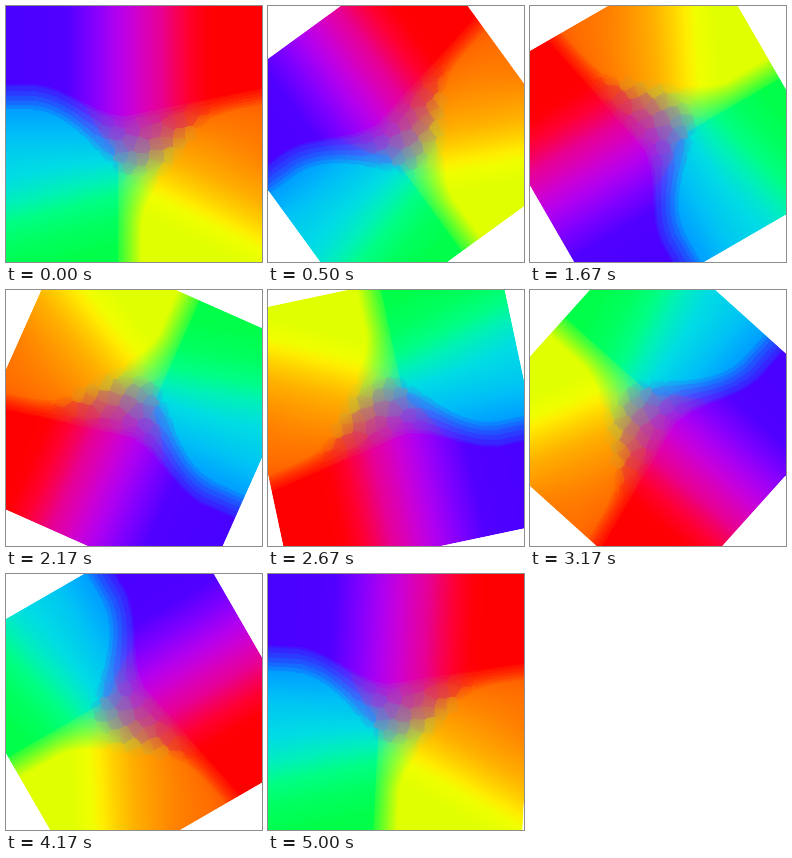
Write an HTML page with a canvas that moves like this. It is 256 by 256 pixels and loops after 5.08 s.

```html
<!DOCTYPE html>
<html lang="en">
<head>
<meta charset="utf-8">
<title>Rotating colour field</title>
<style>
  html, body { margin: 0; width: 100%; height: 100%; overflow: hidden; background: #fff; }
  main { position: relative; width: 100%; height: 100%; overflow: hidden; contain: strict; }
  canvas { position: absolute; left: -9px; top: -7px; width: 270px; height: 270px; }
</style>
</head>
<body>
<main><canvas id="field" width="270" height="270"></canvas></main>
<script>
const SIZE = 270, LEFT = -9, TOP = -7, CELL = 12, LOOP = 5080;
const canvas = document.getElementById('field');

const clamp = v => Math.min(1, Math.max(0, v));
const smooth = v => { v = clamp(v); return v * v * (3 - 2 * v); };
const lerp = (a, b, t) => a + (b - a) * t;
const mix = (a, b, t) => a.map((v, i) => lerp(v, b[i], t));

function ramp(text) {
  const stops = text.split(' ').map(s => {
    const [pos, hex] = s.split('#');
    const n = parseInt(hex, 16);
    return { pos: +pos, rgb: [n >> 16, n >> 8 & 255, n & 255] };
  });
  return v => {
    if (v <= stops[0].pos) return stops[0].rgb;
    for (let i = 1; i < stops.length; i++) {
      const a = stops[i - 1], b = stops[i];
      if (v < b.pos) return mix(a.rgb, b.rgb, (v - a.pos) / (b.pos - a.pos));
    }
    return stops[stops.length - 1].rgb;
  };
}

const violetToRed = ramp('0#4800ff 60#5000ff 85#7e00ff 110#b000f0 128#cc00d4 140#da00b6 155#e60094 168#f40060 182#ff0030 200#ff0008 215#ff0000');
const blueToGreen = ramp('80#0080ff 105#00a0ff 130#00c0f6 160#00dce4 183#00f0b8 203#00ff84 225#00ff60 256#00ff48');
const orangeToLime = ramp('75#ff3800 105#ff6c00 135#ff9000 165#ffb000 185#ffd000 200#ffec00 213#f0ff00 235#e0ff00');

// Lower edge of the violet-to-red area
const ridge = x => 78 + 32 * smooth((x - 25) / 95) - 28 * Math.max(0, x - 120) / 136;

function hash(i, j) {
  const s = Math.sin(i * 127.1 + j * 311.7) * 43758.5453;
  return s - Math.floor(s);
}

// Nearest point of a jittered grid
function nearestSite(x, y) {
  const ci = Math.floor(x / CELL), cj = Math.floor(y / CELL);
  let best = Infinity, site;
  for (let j = cj - 1; j <= cj + 1; j++) {
    for (let i = ci - 1; i <= ci + 1; i++) {
      const sx = (i + 0.15 + 0.7 * hash(i, j)) * CELL;
      const sy = (j + 0.15 + 0.7 * hash(j + 40, i)) * CELL;
      const d = (sx - x) ** 2 + (sy - y) ** 2;
      if (d < best) { best = d; site = [sx, sy]; }
    }
  }
  return site;
}

function topWeight(x, y) {
  const depth = y - ridge(x);
  if (depth < 0) return 1;
  const width = 27 + 36 * Math.exp(-(((x - 130) / 45) ** 2)) - 10 * smooth((x - 150) / 80);
  return 0.85 * clamp(1 - depth / width) ** 0.9;
}

function rightWeight(x, y) {
  const from = 80 + 32 * smooth((y - 95) / 65);
  const to = 206 - 70 * smooth((y - 90) / 130);
  return x < from ? 0 : clamp(0.15 + 0.85 * (x - from) / (to - from));
}

function colourAt(x, y) {
  const depth = y - ridge(x);
  if (depth < 0) return violetToRed(x);
  const facet = 0.65 * clamp(depth / 12) * smooth((x - 80) / 35) * smooth((215 - x) / 30) * smooth((190 - y) / 40);
  const [sx, sy] = nearestSite(x, y);
  const px = lerp(x, sx, facet), py = lerp(y, sy, facet);
  const lower = mix(
    blueToGreen(y + (x - 60) * 0.25 * smooth((y - 130) / 60)),
    orangeToLime(y + (190 - x) * 0.5 * smooth((y - 90) / 80)),
    rightWeight(px, py)
  );
  let w = topWeight(px, py);
  // Contour bands outside the faceted centre
  w = lerp(Math.round(w * 7) / 7, w, clamp(facet * 2));
  return mix(lower, violetToRed(px), w);
}

function paint() {
  const ctx = canvas.getContext('2d');
  const image = ctx.createImageData(SIZE, SIZE);
  for (let j = 0, p = 0; j < SIZE; j++) {
    for (let i = 0; i < SIZE; i++, p += 4) {
      image.data.set([...colourAt(i + LEFT + 0.5, j + TOP + 0.5), 255], p);
    }
  }
  ctx.putImageData(image, 0, 0);
}

// Twelve steps a second; the last step stops just short of a full turn
function turn(now) {
  const tick = Math.floor(now % LOOP / 10);
  const step = Math.floor((tick + 0.5) * 0.12);
  const angle = Math.min(step * 6, 357);
  canvas.style.transform = `rotate(${-angle}deg)`;
}

paint();
const start = performance.now();
function loop() {
  turn(performance.now() - start);
  requestAnimationFrame(loop);
}
loop();
</script>
</body>
</html>
```
